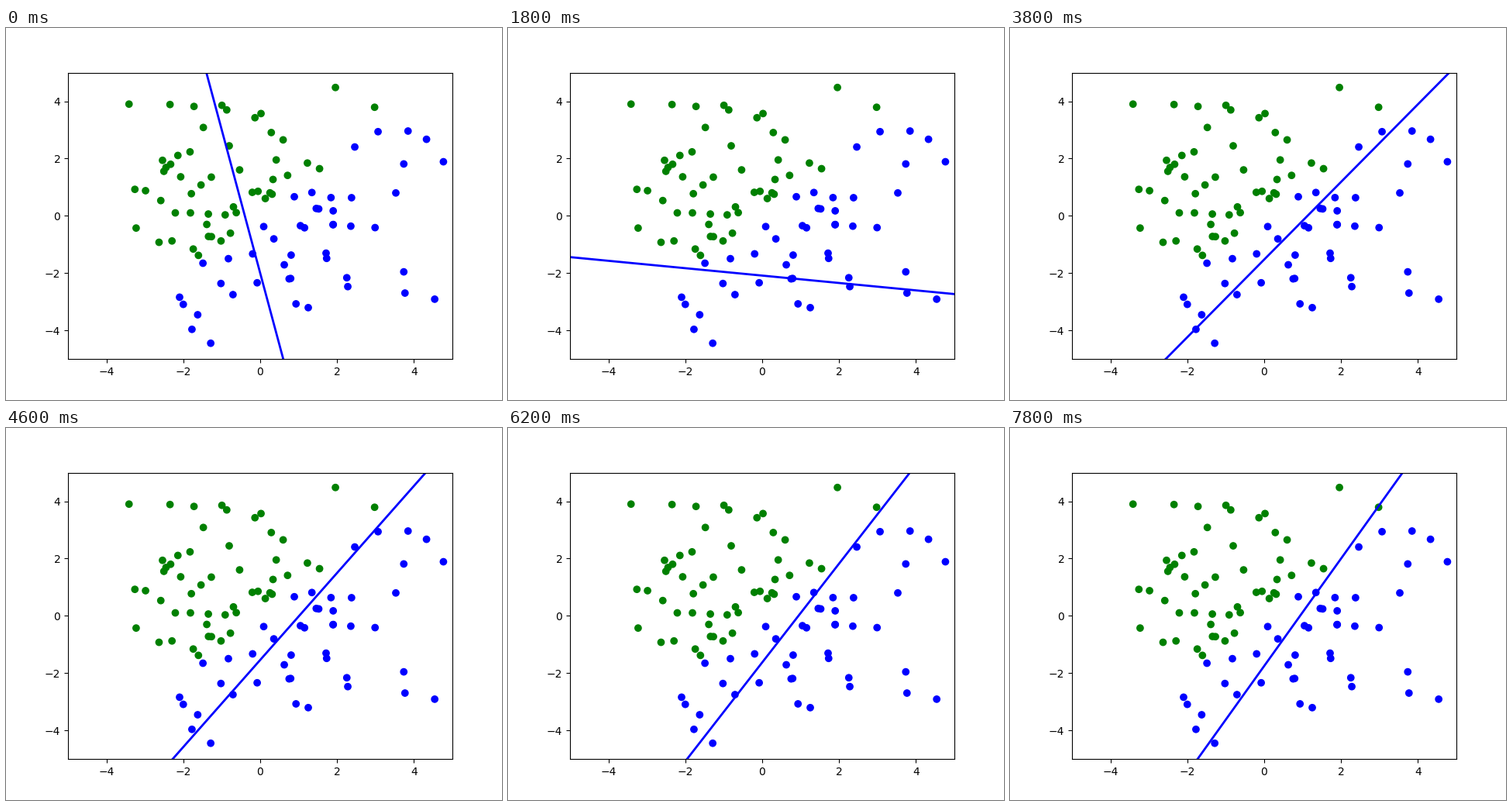
A matplotlib script for the animation above (8000 ms loop, 640 by 480 pixels).

```python
import numpy as np
import matplotlib.pyplot as plt
from matplotlib.animation import FuncAnimation

STEPS = 40
LIM = 5

# Key poses of the boundary y = slope * x + offset: (step, slope, offset)
POSES = [
    (0, -5, -2), (4, -2.38, -2.385), (6, -1.293, -2.335),
    (9, -0.129, -2.085), (15, 1.052, -1.608), (18, 1.295, -1.535),
    (23, 1.519, -1.539), (31, 1.725, -1.626), (39, 1.875, -1.749),
]
KNOTS, SLOPE, OFFSET = np.array(POSES, float).T


def smooth(t, values):
    """Cubic Hermite curve through the key poses."""
    tangents = np.gradient(values, KNOTS, edge_order=2)
    i = min(np.searchsorted(KNOTS, t, side="right") - 1, len(KNOTS) - 2)
    h = KNOTS[i + 1] - KNOTS[i]
    u = (t - KNOTS[i]) / h
    return ((1 + 2 * u) * (1 - u) ** 2 * values[i]
            + u * (1 - u) ** 2 * h * tangents[i]
            + u * u * (3 - 2 * u) * values[i + 1]
            + u * u * (u - 1) * h * tangents[i + 1])


# A normal cloud, split into two classes by the diagonal
np.random.seed(0)
x, y = (2 * np.random.randn(100, 2)).T
colors = np.where(y > x, "green", "blue")

fig, ax = plt.subplots(figsize=(6.4, 4.8), dpi=100)
ax.set_xlim(-LIM, LIM)
ax.set_ylim(-LIM, LIM)
ax.scatter(x, y, c=colors)
ends = np.array([-LIM, LIM])
line, = ax.plot([], [], color="blue", lw=2)


def update(step):
    line.set_data(ends, smooth(step, SLOPE) * ends + smooth(step, OFFSET))
    return line,


anim = FuncAnimation(fig, update, frames=STEPS, interval=200,
                     init_func=lambda: update(0), repeat=True, repeat_delay=0)
plt.show()
```
